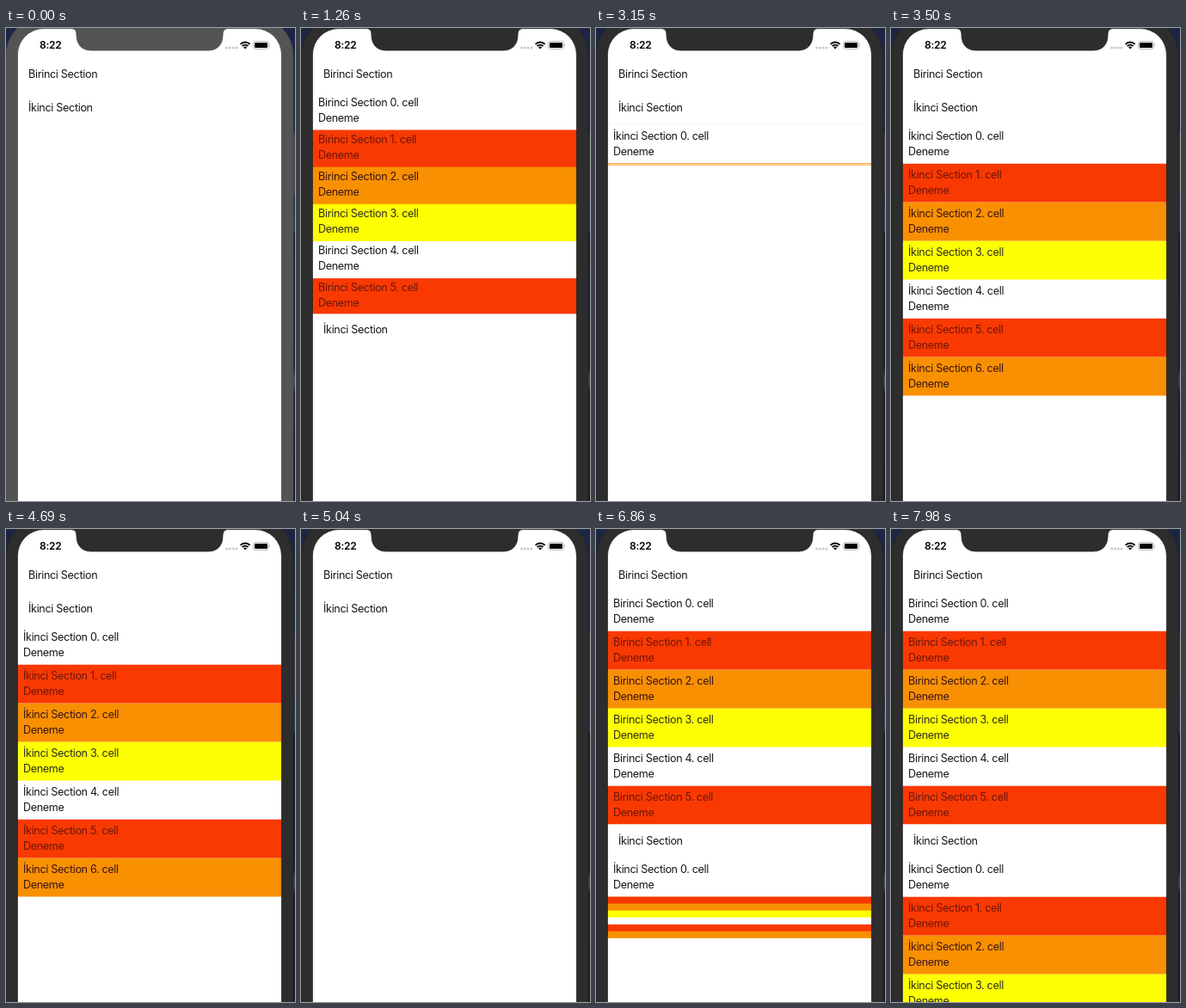
Write an HTML page that moves like this. It is 336 px wide and 550 px high and loops after 8 s.

```html
<!DOCTYPE html>
<html lang="tr">
<head>
<meta charset="utf-8">
<title>Expandable sections</title>
<style>
  html, body { margin: 0; width: 100%; height: 100%; overflow: hidden; }
  body {
    position: relative;
    background: linear-gradient(#1c2544 0, #202a4c 120px, #283354 195px, #303c5c 234px,
      #161b36 240px, #1a1f3a 395px, #474d66 408px, #42475e 416px, #1c1c34 424px, #1a172e 550px);
    font: 12.55px/18px Inter, "Noto Sans", sans-serif;
    letter-spacing: -.31px;
    color: #141414;
  }
  #list {
    position: absolute; left: 13px; top: 0; width: 308px; height: 550px;
    background: #fff; overflow: hidden; isolation: isolate;
  }
  .head, .row { position: absolute; left: 0; top: 0; width: 100%; box-sizing: border-box; white-space: pre; }
  .head { height: 39px; line-height: 38px; padding-left: 13px; background: #fff; z-index: 10; }
  .row { height: 45px; padding: 4px 0 0 7px; }
  .row.red { color: #2c0610; }
  .row.red span { opacity: .68; filter: blur(.4px); }
  .row.orange { color: #3a1418; }
  .row.yellow { color: #2c2c20; }
  .row span { display: block; }
  svg { position: absolute; left: 0; top: 0; }
  .shell { fill: #545454; stroke: #484848; stroke-width: .8; }
  .key { fill: #484848; }
  .focus .shell { fill: #2d2d2d; stroke: #222; }
  .focus .key { fill: #38383b; }
</style>
</head>
<body>
<div id="list"></div>
<svg width="336" height="550" viewBox="0 0 336 550">
  <rect class="key" x="332" y="122" width="6" height="74" rx="1.5"/>
  <path class="shell" fill-rule="evenodd" d="
    M0 560V32A45 45 0 0 1 45 -13H289A45 45 0 0 1 334 32V560Z
    M13.4 560V31A30.4 30.4 0 0 1 43.8 .6H75C80 .6 82 3 82 8C82 19 88 26 99 26H235C246 26 252 19 252 8C252 3 254 .6 259 .6H290A30.4 30.4 0 0 1 320.4 31V560Z"/>
  <text x="39" y="24.3" font-size="12" font-weight="600" letter-spacing="-.25" fill="#000">8:22</text>
  <g fill="#c9c9c9">
    <circle cx="256.6" cy="23" r="1.5"/><circle cx="260.4" cy="23" r="1.5"/>
    <circle cx="264.2" cy="23" r="1.5"/><circle cx="268" cy="23" r="1.5"/>
  </g>
  <g fill="none" stroke="#000" stroke-width="1.9">
    <path d="M272.6 18.8A7.8 7.8 0 0 1 283.6 18.8"/>
    <path d="M274.7 21A4.8 4.8 0 0 1 281.5 21"/>
  </g>
  <path d="M278.1 24.4L276.1 22.4A2.9 2.9 0 0 1 280.1 22.4Z"/>
  <rect x="287.6" y="15.6" width="17.8" height="8.8" rx="2.5" fill="none" stroke="#a0a0a0" stroke-width=".8"/>
  <rect x="289" y="17" width="15" height="6" rx="1.3"/>
  <path d="M306.4 18.6Q307.6 20 306.4 21.4Z" fill="#a0a0a0"/>
</svg>
<script>
const LOOP = 8000, STEP = 70, MOVE = 300, FOCUS_AT = 910;
const TOP = 34.5, HEAD = 39, ROW = 45;
const COLORS = ['#fff', '#f93902', '#f89002', '#fdff02'];
const KINDS = ['white', 'red', 'orange', 'yellow'];

// Each span is [time of opening, time of closing]
const sections = [
  { name: 'Birinci Section', count: 6, spans: [[1003, 2260], [5350, Infinity]] },
  { name: 'İkinci Section', count: 7, spans: [[3132, 4691], [6772, Infinity]] }
];

const list = document.getElementById('list');

function add(className, ...lines) {
  const el = document.createElement('div');
  el.className = className;
  for (const line of lines) {
    const span = document.createElement('span');
    span.textContent = line;
    el.append(span);
  }
  list.append(el);
  return el;
}

for (const s of sections) {
  s.head = add('head', s.name);
  s.rows = Array.from({ length: s.count }, (_, i) => {
    const el = add('row ' + KINDS[i % 4], `${s.name} ${i}. cell`, 'Deneme');
    el.style.background = COLORS[i % 4];
    el.style.zIndex = s.count - i;
    return el;
  });
}

// cubic-bezier(.42, 0, .58, 1)
function ease(x) {
  if (x <= 0) return 0;
  if (x >= 1) return 1;
  let lo = 0, hi = 1, u = .5;
  for (let i = 0; i < 24; i++) {
    u = (lo + hi) / 2;
    const v = 1 - u;
    if (1.26 * u * v * v + 1.74 * u * u * v + u * u * u < x) lo = u; else hi = u;
  }
  return u * u * (3 - 2 * u);
}

function openness(spans, t) {
  let p = 0;
  for (const [open, close] of spans) {
    p += ease((t - open) / MOVE) - ease((t - close) / MOVE);
  }
  return p;
}

const place = (el, y) => { el.style.transform = `translateY(${y.toFixed(2)}px)`; };

function render(t) {
  document.body.classList.toggle('focus', t >= FOCUS_AT);
  let y = TOP;
  for (const s of sections) {
    const p = openness(s.spans, t);
    place(s.head, y);
    y += HEAD;
    s.rows.forEach((el, i) => {
      el.style.visibility = p > 0 ? 'visible' : 'hidden';
      place(el, y + i * ROW * p);
    });
    y += s.count * ROW * p;
  }
}

const start = performance.now();
function tick() {
  const t = (performance.now() - start) % LOOP;
  render(Math.floor(t / STEP) * STEP);
  requestAnimationFrame(tick);
}
tick();
</script>
</body>
</html>
```
